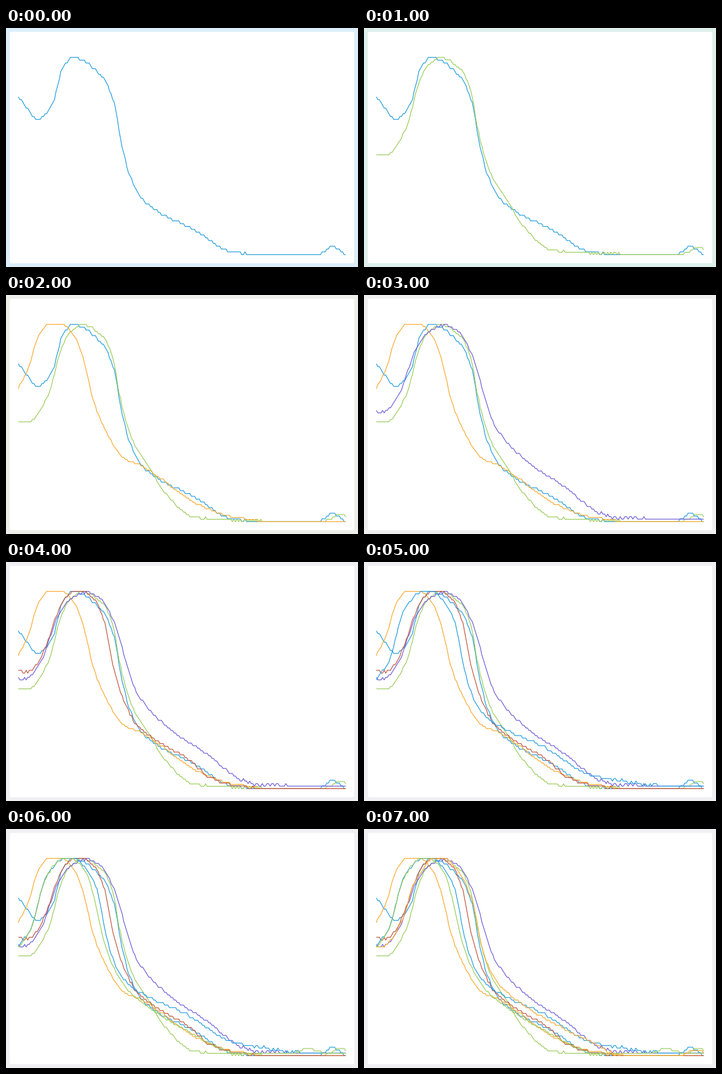
A matplotlib script for the animation above (8 s loop, 558 by 380 pixels).

```python
import numpy as np
import matplotlib.pyplot as plt
from matplotlib.animation import FuncAnimation
from matplotlib.patches import FancyBboxPatch

W, H, DPI = 558, 380, 100
TOP, BASE = 46.7, 360.4
LEFT, RIGHT, SAMPLES = 19.5, 538.5, 208
BLUE, GREEN, ORANGE = "#1f9bde", "#98cb56", "#f9a72b"
PURPLE, RED = "#6a5bd8", "#c0533c"
PAGE = ["#dceef9", "#deefec", "#eeeeeb", "#efefef"] + ["#f0eff2"] * 4

fig = plt.figure(figsize=(W / DPI, H / DPI), dpi=DPI)
ax = fig.add_axes([0, 0, 1, 1])
ax.set(xlim=(0, W), ylim=(H, 0))
ax.axis("off")
ax.add_patch(FancyBboxPatch((6, 6), 546, 368, fc="white", ec="none",
                            boxstyle="round,pad=0,rounding_size=3"))

curves = []


def smooth(x, kx, ky):
    """Monotone cubic through the knots: no overshoot, flat at extremes."""
    h = np.diff(kx)
    d = np.diff(ky) / h
    same = d[:-1] * d[1:] > 0
    total = np.where(same, d[:-1] + d[1:], 1)
    mid = np.where(same, 2 * d[:-1] * d[1:] / total, 0)
    m = np.concatenate([d[:1], mid, d[-1:]])
    i = np.clip(np.searchsorted(kx, x, side="right") - 1, 0, len(h) - 1)
    t = (x - kx[i]) / h[i]
    ease = t * t * (3 - 2 * t)
    return (ky[i] + (ky[i + 1] - ky[i]) * ease
            + h[i] * (m[i] * t * (1 - t) ** 2 - m[i + 1] * t * t * (1 - t)))


def add_curve(color, levels, knots, rough=(0, 0), bump=(0, 0, 1)):
    """Draw a noisy curve snapped to whole levels, flat after the last knot."""
    rng = np.random.default_rng(len(curves) + 3)
    kx, ky = np.array(knots + [(W, knots[-1][1])], float).T
    x = np.linspace(LEFT, RIGHT, SAMPLES + 1)
    center, height, width = bump
    y = smooth(x, kx + 0.5, ky) - height * np.exp(-((x - center) / width) ** 2)
    step = (BASE - TOP) / levels
    amp = np.where((x > rough[0]) & (x < rough[1]), 0.7, 0.2)
    count = (BASE - y) / step + amp * rng.uniform(-1, 1, x.size)
    y = BASE - step * np.clip(np.round(count), 0, levels)
    line, = ax.plot(x, y, color=color, lw=1.15 * 72 / DPI,
                    solid_joinstyle="round", solid_capstyle="butt")
    curves.append(line)


add_curve(BLUE, 70, [
    (19, 109), (52, 145), (74, 118), (89, 65), (106, 47), (150, 75),
    (171, 119), (181, 177), (196, 235), (216, 272), (240, 292), (298, 321),
    (357, 356), (400, 360)], rough=(382, 396), bump=(518, 13, 12))

add_curve(GREEN, 83, [
    (19, 203), (36, 202), (64, 165), (90, 78), (104, 57), (120, 47),
    (156, 70), (170, 105), (180, 161), (198, 226), (225, 272), (255, 318),
    (297, 353), (408, 360)], rough=(360, 405), bump=(530, 11, 15))

add_curve(ORANGE, 92, [
    (19, 148), (34, 118), (51, 65), (67, 47), (89, 47), (108, 66),
    (124, 108), (137, 164), (155, 211), (186, 259), (215, 272), (310, 336),
    (358, 352), (415, 360)])

add_curve(PURPLE, 78, [
    (19, 185), (31, 186), (55, 157), (84, 82), (108, 54), (127, 48),
    (148, 58), (172, 98), (196, 180), (211, 215), (262, 268), (313, 302),
    (385, 351), (450, 356)], rough=(374, 446))

add_curve(RED, 70, [
    (19, 173), (34, 175), (62, 137), (79, 85), (106, 47), (119, 47),
    (143, 65), (155, 93), (170, 168), (183, 212), (208, 260), (295, 318),
    (320, 341), (365, 356), (416, 360)])

add_curve(BLUE, 78, [
    (19, 186), (38, 160), (64, 75), (92, 47), (108, 47), (128, 66),
    (144, 97), (159, 173), (176, 222), (200, 252), (290, 297), (352, 336),
    (390, 345), (480, 356)], rough=(390, 470))

add_curve(GREEN, 83, [
    (19, 188), (38, 161), (64, 75), (92, 47), (104, 47), (126, 68),
    (139, 108), (152, 168), (174, 228), (200, 264), (296, 326), (340, 349),
    (365, 356)], bump=(480, 7, 13))

add_curve(ORANGE, 78, [
    (19, 188), (34, 184), (60, 145), (78, 90), (110, 47), (127, 47),
    (150, 69), (172, 118), (186, 186), (203, 230), (225, 259), (350, 334),
    (417, 360)], rough=(380, 415), bump=(527, 9, 17))


def draw(i):
    fig.set_facecolor(PAGE[i])
    for k, line in enumerate(curves):
        line.set_visible(k <= i)
    return curves


anim = FuncAnimation(fig, draw, frames=len(curves), interval=1000,
                     init_func=lambda: draw(0), repeat=True, repeat_delay=0,
                     blit=False)
plt.show()
```
